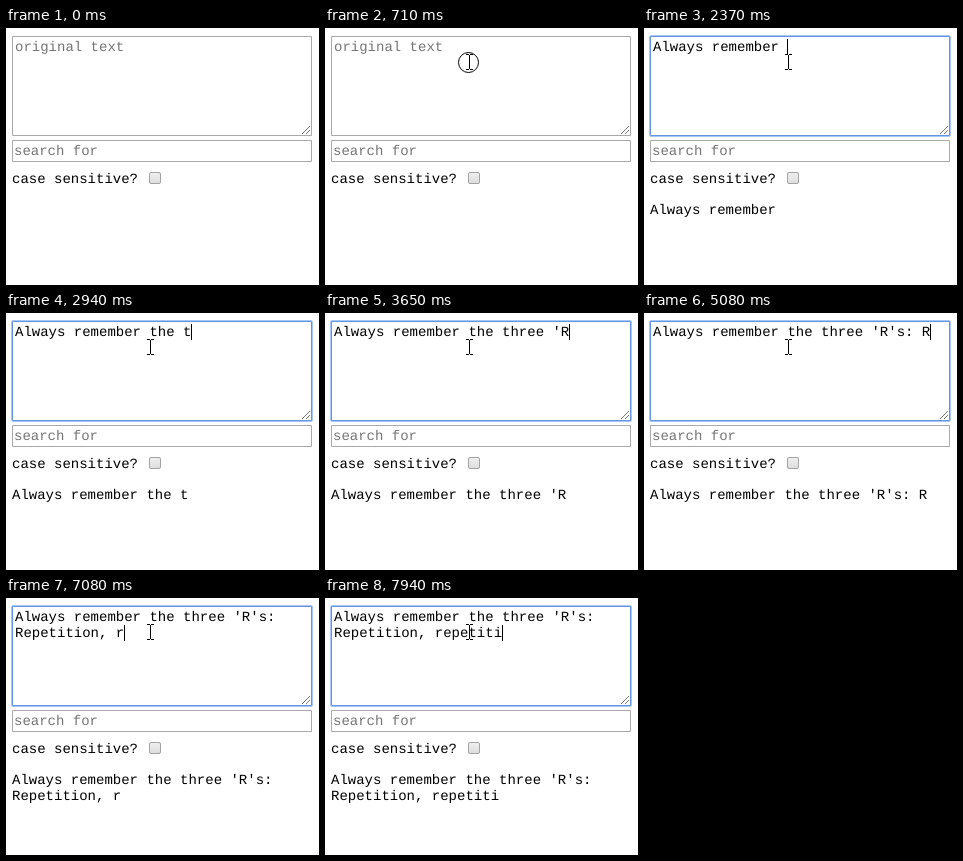
These frames come from a looping animation (313 by 257 pixels, 8000 ms). An HTML page with a canvas:

```html
<!DOCTYPE html>
<html lang="en">
<head>
<meta charset="utf-8">
<title>Typing demo</title>
<style>
  html, body { margin: 0; width: 100%; height: 100%; overflow: hidden; background: #fff; }
  #stage { position: relative; width: 313px; height: 257px; overflow: hidden; }
  #stage div {
    position: absolute; white-space: pre; color: #000;
    font: 14px/16px "Liberation Mono", "Courier New", monospace;
    text-rendering: geometricPrecision;
  }
  #stage .hint { color: #757575; }
  #area { left: 9px; top: 12px; }
  #search { left: 8px; top: 116px; }
  #label { left: 6px; top: 144px; }
  #output { left: 6px; top: 175px; }
  canvas { position: absolute; left: 0; top: 0; }
</style>
</head>
<body>
<div id="stage">
  <div id="area" class="hint">original text</div>
  <div id="search" class="hint">search for</div>
  <div id="label">case sensitive?</div>
  <div id="output"></div>
  <canvas id="shapes" width="313" height="257"></canvas>
</div>
<script>
const LOOP = 8000;
const CHAR = 8.4;
const LINE = 16;
const MESSAGE = "Always remember the three 'R's: Repetition, repetiti";

// Typing rhythm: [time in ms, letters typed], steady pace in between
const RHYTHM = [
  [1000, 0], [1580, 7], [1720, 8], [2370, 16], [2570, 17], [3240, 26],
  [3650, 28], [4440, 30], [4800, 32], [5080, 33], [5600, 36], [6170, 37],
  [6260, 38], [6720, 39], [6780, 42], [7250, 47], [7940, 52]
];

const area = document.getElementById("area");
const output = document.getElementById("output");
const ctx = document.getElementById("shapes").getContext("2d");

function typedCount(t) {
  const next = RHYTHM.findIndex(([time]) => time > t);
  if (next === 0) return 0;
  if (next < 0) return MESSAGE.length;
  const [t0, n0] = RHYTHM[next - 1];
  const [t1, n1] = RHYTHM[next];
  return Math.floor(n0 + (n1 - n0) * (t - t0) / (t1 - t0) + 1e-6);
}

function wrap(text, limit) {
  if (text.length <= limit) return [text];
  const cut = text.lastIndexOf(" ", limit) + 1;
  return [text.slice(0, cut), ...wrap(text.slice(cut), limit)];
}

function setText(el, text) {
  if (el.textContent !== text) el.textContent = text;
}

function rect(x, y, w, h, color) {
  ctx.fillStyle = color;
  ctx.fillRect(x, y, w, h);
}

function frame(x, y, w, h, color, radius = 0) {
  ctx.strokeStyle = color;
  ctx.beginPath();
  ctx.roundRect(x + 0.5, y + 0.5, w - 1, h - 1, radius);
  ctx.stroke();
}

function line(x1, y1, x2, y2, color) {
  ctx.strokeStyle = color;
  ctx.beginPath();
  ctx.moveTo(x1, y1);
  ctx.lineTo(x2, y2);
  ctx.stroke();
}

function drawForm(focused) {
  if (focused) frame(5, 7, 302, 102, "#a6c6fa", 1.5);
  frame(6, 8, 300, 100, focused ? "#6595de" : "#a9a9a9");
  for (const size of [8, 4]) line(304 - size, 106, 304, 106 - size, "#777");
  frame(6, 112, 300, 22, "#a9a9a9");

  const shade = ctx.createLinearGradient(0, 144, 0, 156);
  shade.addColorStop(0, "#f0f0f0");
  shade.addColorStop(1, "#dcdcdc");
  rect(143.5, 144.5, 11, 11, shade);
  frame(143, 144, 12, 12, "#a3a3a3", 1.5);
}

function drawBeam(x, y) {
  for (const row of [y - 8, y + 7]) {
    rect(x - 3, row, 3, 1, "#000");
    rect(x + 1, row, 3, 1, "#000");
  }
  rect(x, y - 7, 1, 14, "#000");
}

function drawArrow(x, y) {
  ctx.beginPath();
  ctx.moveTo(x, y);
  ctx.lineTo(x, y + 16);
  ctx.lineTo(x + 4, y + 12);
  ctx.lineTo(x + 11, y + 11);
  ctx.closePath();
  ctx.fillStyle = "#fff";
  ctx.fill();
  ctx.strokeStyle = "#000";
  ctx.stroke();
  line(x + 5, y + 12, x + 8, y + 18, "#000");
}

function drawPointer(t) {
  if (t < 340) return;
  const step = Math.min(3, Math.floor((t - 340) / 56.6));
  if (step === 0) drawArrow(300.5, 89.5);
  else drawBeam(300 - 52 * step, 97 - 21 * step);

  if (t >= 710 && t < 940) {
    ctx.strokeStyle = "#000";
    ctx.beginPath();
    ctx.arc(143.5, 34.5, 10, 0, Math.PI * 2);
    ctx.stroke();
  }
}

function drawCaret(t, lines) {
  const blinkedOff = t >= 6050 && t < 6170;
  if (t < 760 || blinkedOff) return;
  const row = lines.length - 1;
  rect(Math.round(9 + CHAR * lines[row].length), 11 + LINE * row, 1, LINE, "#000");
}

function render(t) {
  const typed = MESSAGE.slice(0, typedCount(t));
  const lines = wrap(typed, 34);
  area.className = typed ? "" : "hint";
  setText(area, typed ? lines.join("\n") : "original text");
  setText(output, wrap(typed, 35).join("\n"));

  ctx.clearRect(0, 0, 313, 257);
  drawForm(t >= 760);
  drawCaret(t, lines);
  drawPointer(t);
}

function tick() {
  render(performance.now() % LOOP);
  requestAnimationFrame(tick);
}
render(0);
requestAnimationFrame(tick);
</script>
</body>
</html>
```
